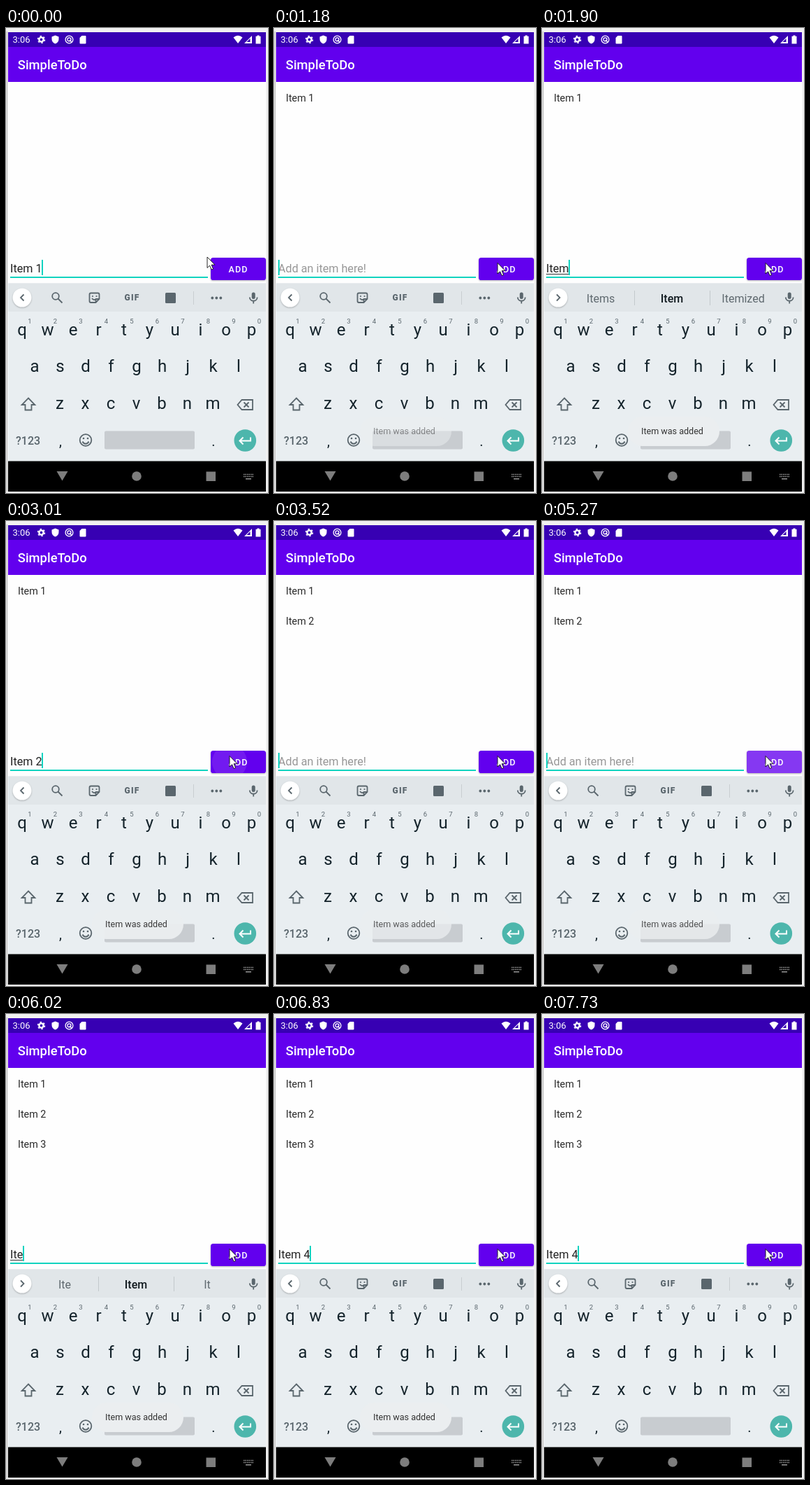
Animation, 375 px wide and 664 px high, one loop 8000 ms. Source, as an HTML page:

```html
<!DOCTYPE html>
<html lang="en">
<head>
<meta charset="utf-8">
<title>To-do list</title>
<style>
html, body { margin: 0; width: 100%; height: 100%; overflow: hidden; background: #f1f1f1; }
svg { display: block; font-family: Roboto, sans-serif; }
text { white-space: pre; }
.mid { text-anchor: middle; }
.medium { font-weight: 500; }
.icon { fill: none; stroke: #5a666d; stroke-width: 1.8; }
.solid { fill: #5a666d; }
</style>
</head>
<body>
<svg width="375" height="664" viewBox="0 0 375 664">
  <defs>
    <clipPath id="buttonClip"><rect x="293" y="328" width="79" height="32" rx="3.6"/></clipPath>
    <filter id="shadow" x="-20%" y="-20%" width="140%" height="150%">
      <feDropShadow dx="0" dy="1" stdDeviation="1" flood-opacity=".3"/>
    </filter>
  </defs>
  <path d="M1.5 5V662" stroke="#b8b8b8"/>
  <rect x="3" y="6" width="369" height="656" fill="#fefefe"/>

  <!-- status and app bars -->
  <rect x="3" y="6" width="369" height="21" fill="#3700b3"/>
  <rect x="3" y="27" width="369" height="50" fill="#6200ee"/>
  <g fill="#fff">
    <text x="9.5" y="21" font-size="13">3:06</text>
    <text x="16.8" y="59" font-size="18.4" class="medium">SimpleToDo</text>
    <circle cx="50.5" cy="16.5" r="3.1" fill="none" stroke="#fff" stroke-width="2.4"/>
    <circle cx="50.5" cy="16.5" r="4.9" fill="none" stroke="#fff" stroke-width="1.6" stroke-dasharray="2.4 2.73"/>
    <path d="M70.5 10.5l5 2v3.6c0 3-2 5.4-5 6.4c-3-1-5-3.4-5-6.4v-3.6z"/>
    <g fill="none" stroke="#fff" stroke-width="1.3">
      <circle cx="90.5" cy="16.5" r="5.4"/><circle cx="90.5" cy="16.3" r="2.5"/><path d="M91 17l3 3.4"/>
    </g>
    <path d="M108.5 11h5q1 0 1 1v9.5q0 1-1 1h-7q-1 0-1-1v-7.5z"/>
    <path d="M325.5 13.5q6.5-5.5 13 0l-6.5 8.5zM352 11v11h-11z"/>
    <path d="M349.5 15v5h-5z" fill="#3700b3"/>
    <path d="M359.5 10.5h3v1.3h2v10.7h-7v-10.7h2z"/>
  </g>

  <g id="list" font-size="14.37" fill="#2a2a2a"></g>

  <!-- entry row -->
  <path d="M6 356H289" stroke="#12d3c0" stroke-width="2"/>
  <text id="hint" x="6" y="349" font-size="16.16" fill="#979797">Add an item here!</text>
  <text id="entry" x="6" y="349" font-size="16.16" fill="#212121"></text>
  <path id="composing" stroke="#333" stroke-width="1"/>
  <rect id="caret" y="331" width="2" height="22" fill="#12d3c0"/>
  <rect x="293" y="328" width="79" height="32" rx="3.6" fill="#6200ee" filter="url(#shadow)"/>
  <circle id="ripple" cx="320" cy="344" fill="#fff" clip-path="url(#buttonClip)"/>
  <text x="332.6" y="348.5" font-size="12.57" letter-spacing="1.12" class="mid medium" fill="#fff">ADD</text>

  <!-- keyboard -->
  <rect x="3" y="364.5" width="369" height="255" fill="#e9eef1"/>
  <rect x="3" y="364.5" width="369" height="40.5" fill="#e1e6e9"/>
  <circle cx="23" cy="385" r="13.3" fill="#fff" filter="url(#shadow)"/>
  <path id="chevron" class="icon"/>
  <g class="solid">
    <rect x="351.7" y="377.5" width="5" height="9.5" rx="2.5"/>
    <path class="icon" d="M348.8 384.5c0 7 10.8 7 10.8 0M354.2 390v3.5"/>
  </g>
  <g id="tools">
    <g class="icon">
      <circle cx="71" cy="383" r="4.8"/><path d="M74.5 386.5l6 6"/>
      <path d="M121.5 378.5h10q2 0 2 2v6.5l-5 5h-7q-2 0-2-2v-9.5q0-2 2-2zM133.5 387h-4q-1 0-1 1v4M123 386q3 4 6 .5"/>
    </g>
    <g class="solid">
      <circle cx="124" cy="383" r="1.1"/><circle cx="129.5" cy="383" r="1.1"/>
      <text x="180.5" y="389.3" font-size="12" font-weight="900" letter-spacing="1.2" class="mid">GIF</text>
      <rect x="228" y="378" width="15" height="15" rx="1.5"/>
      <circle cx="295.3" cy="385.5" r="1.9"/><circle cx="301.3" cy="385.5" r="1.9"/><circle cx="307.3" cy="385.5" r="1.9"/>
    </g>
    <path d="M268.5 376V395" stroke="#c9ced1"/>
  </g>
  <g id="words" class="mid" font-size="16" fill="#5f696f">
    <path d="M132.5 375V396M240.5 375V396" stroke="#c3c9cc"/>
    <text x="84" y="391.5"></text>
    <text x="186" y="391.5" class="medium" fill="#10191e"></text>
    <text x="288" y="391.5"></text>
  </g>
  <g id="keys" class="mid" fill="#14232b"></g>
  <g class="icon">
    <path d="M32 528.5l9.3 9.5h-4.8v7.5h-9v-7.5h-4.8z"/>
    <path d="M337.5 531h15.5v14h-15.5l-6-7zM340.5 534.5l7 7M347.5 534.5l-7 7"/>
    <circle cx="114" cy="588.5" r="8.3"/><path d="M109.5 590.5c2 4.3 7 4.3 9 0"/>
  </g>
  <g class="solid">
    <circle cx="111" cy="586" r="1.3"/><circle cx="117" cy="586" r="1.3"/>
    <text x="14" y="594.5" font-size="16" class="medium">?123</text>
  </g>
  <rect x="141" y="575.5" width="129" height="26" rx="2" fill="#c8ccd0"/>
  <circle cx="342.3" cy="589" r="15.8" fill="#4db6ac"/>
  <path d="M350 584.5v5h-15M339.5 584.5l-5 5l5 5" fill="none" stroke="#fff" stroke-width="2"/>

  <g id="toast">
    <rect x="123" y="555" width="131" height="42" rx="21" fill="#ebeef0"/>
    <text x="142" y="580" font-size="12.57" fill="#333">Item was added</text>
  </g>

  <!-- navigation bar -->
  <rect x="3" y="618.5" width="369" height="43.5" fill="#000"/>
  <g fill="#7d7d7d">
    <path d="M72.5 633h16l-8 13.5z"/>
    <circle cx="187" cy="640" r="6.8"/>
    <rect x="286.5" y="633.5" width="13.5" height="13.5"/>
    <path d="M340 637.5h14M340 640.5h14" stroke="#9a9a9a" stroke-width="1.5" stroke-dasharray="1.5 1"/>
    <path d="M343 643.8h8" stroke="#9a9a9a" stroke-width="1.5"/>
  </g>

  <path id="pointer" d="M0 0V15.5L3.6 12.2L6.1 18L8.6 17L6.1 11.2H11Z" fill="#fff" stroke="#111" stroke-width=".9"/>
</svg>
<script>
const LOOP = 8000;
const el = id => document.getElementById(id);

function addText(parent, x, y, content, attrs = {}) {
  const node = document.createElementNS('http://www.w3.org/2000/svg', 'text');
  Object.entries({ x, y, ...attrs }).forEach(([name, value]) => node.setAttribute(name, value));
  node.textContent = content;
  return parent.appendChild(node);
}

const rows = [['qwertyuiop', 23, 439, 24], ['asdfghjkl', 41, 491, 24], ['zxcvbnm', 77, 544, 24], [',', 78, 596.5, 20], ['.', 297, 597, 20]];
for (const [letters, left, baseline, size] of rows)
  [...letters].forEach((letter, i) => addText(el('keys'), left + i * 36.5, baseline, letter, { 'font-size': size }));
for (let i = 0; i < 10; i++)
  addText(el('keys'), 34 + i * 36.5, 421.5, (i + 1) % 10, { 'font-size': 9.5, fill: '#5a666d' });
const items = [1, 2, 3].map(n => addText(el('list'), 17, 62 + n * 43, 'Item ' + n));

// Suggestion strips; null shows the toolbar instead.
const none = [], i1 = ['I', 'I’m', 'It'], i2 = ['It', 'It’s', 'Its'], i3 = ['Ite', 'Item', 'It'];
const i4 = ['Items', 'Item', 'Itemized'], next = ['is', 'number', 'and'];
const press = { r: 25, glow: .1 }, full = { r: 70, glow: .22 }, fading = { r: 70, glow: .1 }, idle = { r: 0, glow: 0 };

// Each step changes part of the state and holds until the next one.
const steps = [
  [0, { text: 'Item 1', caret: 1, count: 0, bar: null, ripple: idle, toast: 0, pointer: [288, 327] }],
  [150, { pointer: [320, 327] }],
  [300, { caret: 0 }],
  [670, { pointer: [320, 328.5] }],
  [810, { caret: 1, ripple: press, pointer: [320, 335.5] }],
  [940, { text: '', ripple: full }],
  [1060, { count: 1, ripple: fading, toast: .15 }],
  [1180, { ripple: idle, toast: .5 }],
  [1300, { toast: .75 }],
  [1420, { toast: .92 }],
  [1540, { toast: 1 }],
  [1660, { text: 'I', bar: i1 }],
  [1780, { text: 'It', bar: i2 }],
  [1900, { text: 'Item', bar: i4 }],
  [2020, { text: 'Item ', bar: next }],
  [2140, { text: 'Item 2', bar: null }],
  [2510, { caret: 0 }],
  [3010, { caret: 1, ripple: press, toast: .95 }],
  [3130, { text: '', ripple: full, toast: .75 }],
  [3280, { count: 2, ripple: fading, toast: .2 }],
  [3400, { ripple: idle, toast: .4 }],
  [3520, { toast: .75 }],
  [3660, { text: 'I', bar: i1, toast: .92 }],
  [3790, { text: 'Ite', bar: i3, toast: 1 }],
  [3930, { text: 'Item ', bar: next }],
  [4330, { text: 'Item 3', bar: none }],
  [4470, { bar: null }],
  [4840, { caret: 0 }],
  [5150, { caret: 1, ripple: press }],
  [5270, { text: '', ripple: full, toast: .8 }],
  [5390, { count: 3, ripple: fading, toast: .25 }],
  [5510, { ripple: idle, toast: .45 }],
  [5630, { toast: .8 }],
  [5780, { text: 'I', bar: i1, toast: .95 }],
  [5900, { text: 'It', bar: i2, toast: 1 }],
  [6020, { text: 'Ite', bar: i3 }],
  [6140, { text: 'Item', bar: i4 }],
  [6260, { text: 'Item ', bar: next }],
  [6690, { caret: 0 }],
  [6830, { text: 'Item 4', caret: 1, bar: null }],
  [7250, { caret: 0 }],
  [7370, { toast: .8 }],
  [7490, { toast: .5 }],
  [7610, { toast: .2 }],
  [7730, { caret: 1, toast: 0 }],
];

const show = (node, visible) => node.setAttribute('visibility', visible ? 'visible' : 'hidden');

function draw(time) {
  const state = Object.assign({}, ...steps.filter(([at]) => at <= time).map(([, change]) => change));
  const { text, bar, ripple } = state;

  items.forEach((item, i) => show(item, i < state.count));
  el('entry').textContent = text;
  show(el('hint'), !text);
  const end = Math.floor(6 + (text ? el('entry').getComputedTextLength() : 0));
  el('caret').setAttribute('x', end);
  show(el('caret'), state.caret);
  el('composing').setAttribute('d', /^\w+$/.test(text) ? `M6 351.5H${end}` : '');

  show(el('tools'), !bar);
  show(el('words'), bar && bar.length);
  el('words').querySelectorAll('text').forEach((word, i) => word.textContent = bar?.[i] ?? '');
  el('chevron').setAttribute('d', bar ? 'M21 380.5l4.5 4.5l-4.5 4.5' : 'M25.5 380.5l-4.5 4.5l4.5 4.5');

  el('ripple').setAttribute('r', ripple.r);
  el('ripple').setAttribute('opacity', ripple.glow);
  el('toast').setAttribute('opacity', state.toast);
  el('pointer').setAttribute('transform', `translate(${state.pointer})`);
}

const start = performance.now();
function tick() {
  draw((performance.now() - start) % LOOP);
  requestAnimationFrame(tick);
}
tick();
</script>
</body>
</html>
```
